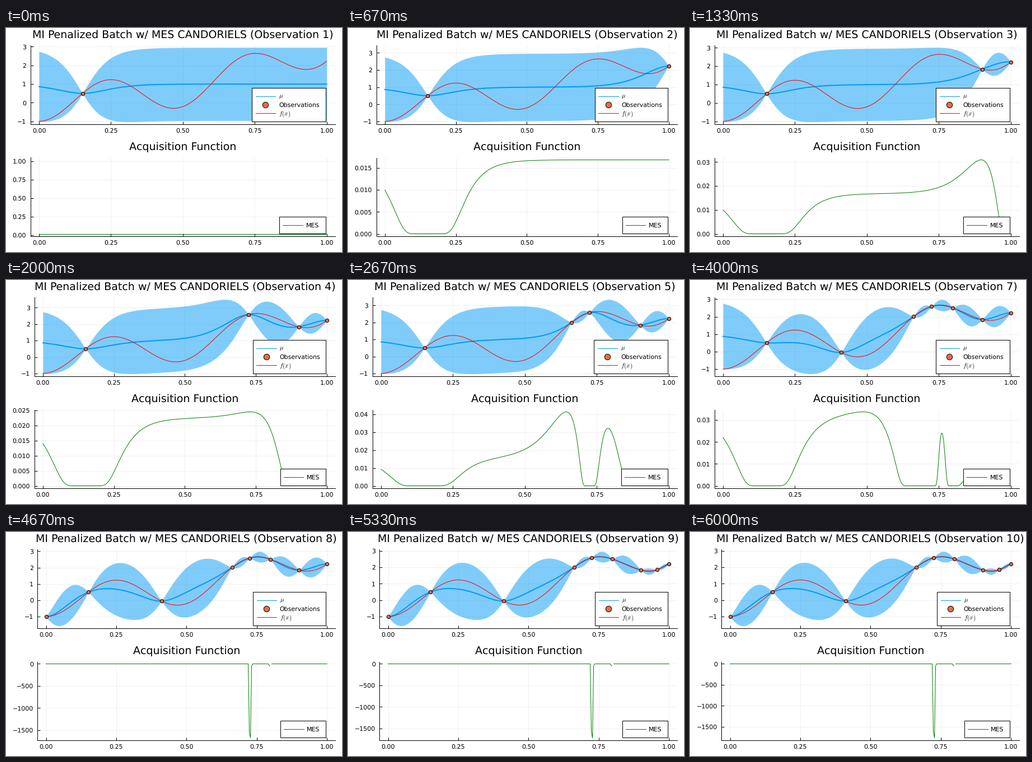
Write a matplotlib script that moves like this. It is 600 by 400 pixels and loops after 6670 ms.

```python
import math

import matplotlib.pyplot as plt
import numpy as np
from matplotlib.animation import FuncAnimation
from matplotlib.patches import Rectangle

W, H, DPI = 600, 400, 100
PX = 72 / DPI  # one pixel in points
BLUE, ORANGE = "#009AF9", "#E26F46"
RIGHT = 588
FRAMES, INTERVAL = 145, 46

plt.rcParams.update({
    "font.family": "DejaVu Sans",
    "font.size": 8,
    "mathtext.fontset": "cm",
    "text.hinting": "none",
    "text.hinting_factor": 1,
})

# Points in the order they are sampled, and the maximum expected before each
SAMPLES = [0.151, 1, 0.901, 0.7245, 0.6625, 0.7985, 0.411, 0, 0.958, 0.958]
BEST = [3.4, 3.4, 3.4, 3.25, 3.43, 3.35, 3.03]

grid = np.linspace(0, 1, 601)
erf = np.vectorize(math.erf)


def f(x):
    return -np.cos(13 * x) + x * (0.53 + 1.44 * x + 1.16 * x * x)


def matern(a, b, scale=0.1):
    r = math.sqrt(5) * np.abs(a[:, None] - b[None, :]) / scale
    return (1 + r + r * r / 3) * np.exp(-r)


def posterior(obs):
    """Mean and deviation on the grid, with prior mean 1 and variance 1."""
    obs = np.unique(np.array(obs, float))
    if not len(obs):
        return np.ones_like(grid), np.ones_like(grid)
    cov = matern(obs, obs) + 1e-8 * np.eye(len(obs))
    cross = matern(grid, obs)
    mean = 1 + cross @ np.linalg.solve(cov, f(obs) - 1)
    var = 1 - np.sum(cross * np.linalg.solve(cov, cross.T).T, axis=1)
    return mean, np.sqrt(np.maximum(var, 1e-8))


def entropy(obs, best):
    mean, dev = posterior(obs)
    g = (best - mean) / dev
    pdf = np.exp(-g * g / 2) / math.sqrt(2 * math.pi)
    cdf = (1 + erf(g / math.sqrt(2))) / 2
    return 0.62 * g * pdf / (2 * cdf)


def breakdown(depth):
    """Coarsely sampled spike with a small dip and a gap after it."""
    x = np.linspace(0, 1, 251)
    y = -depth * np.exp(-(np.abs(x - 0.7268) / 0.0042) ** 6)
    y -= 50 * np.exp(-((x - 0.796) / 0.0022) ** 2)
    y[np.abs(x - 0.8) < 0.001] = np.nan
    return x, y


def acquisition(step):
    if step < len(BEST):
        return grid, entropy(SAMPLES[:step], BEST[step])
    return breakdown(1675 + 45 * (step - len(BEST)))


def limits(lo, hi):
    if hi == lo:
        hi = lo + 1
    pad = 0.03 * (hi - lo)
    return lo - pad, hi + pad


def ticks(lo, hi):
    """Round tick values, at most six intervals, with their labels."""
    power = 10.0 ** math.floor(math.log10((hi - lo) / 6))
    gap = next(m * power for m in (1, 2.5, 5, 10) if (hi - lo) / (m * power) <= 6)
    digits = len(f"{gap:g}".partition(".")[2])
    values = np.arange(math.ceil(lo / gap), math.floor(hi / gap) + 1) * gap
    labels = ["\u2212" * (v < 0) + f"{abs(v):.{digits}f}" for v in values]
    return values, labels


def label_width(text):
    em = {".": 0.318, "\u2212": 0.838}
    return 8 / PX * sum(em.get(c, 0.636) for c in text)


def style(ax, left, bottom, height, span, marks):
    """Place the panel (pixels from the top) and set its ticks."""
    ax.set_position([left / W, 1 - bottom / H, (RIGHT - left) / W, height / H])
    ax.set_xlim(-0.03, 1.03)
    ax.set_ylim(*span)
    ax.set_yticks(*marks)
    xt = np.linspace(0, 1, 5)
    ax.set_xticks(xt, [f"{t:.2f}" for t in xt])
    ax.tick_params(direction="in", length=5 * PX, width=PX)
    ax.tick_params(axis="x", pad=7.2 * PX)
    ax.tick_params(axis="y", pad=7.5 * PX)
    ax.grid(True, color="black", alpha=0.06, lw=PX)
    ax.set_axisbelow(True)
    ax.patch.set_visible(False)
    ax.spines[["top", "right"]].set_visible(False)
    ax.spines[["left", "bottom"]].set_linewidth(PX)


def box(x, y, right, bottom):
    over.add_patch(Rectangle((x, y), right - x, bottom - y, fc="white",
                             ec="black", lw=PX))


def dots(ax, x, y, size):
    ax.plot(x, y, "o", ms=size * PX, mfc=ORANGE, mec="black", mew=PX, zorder=4)


def entry(x, y, label, color=None):
    if color:
        over.plot([x, x + 35.5], [y, y], color=color, lw=PX)
    else:
        dots(over, [x + 17.5], [y], 10.4)
    over.text(x + 41, y, label, va="center_baseline")


def legends(shift):
    box(439.5 + shift, 106.5, 570.5, 167)
    entry(446 + shift, 121.5, r"$\mu$", BLUE)
    entry(446 + shift, 137, "Observations")
    entry(446 + shift, 152, "$f(x)$", "red")
    box(488.5 + shift, 336.5, 570.5, 367)
    entry(494.5 + shift, 352, "MES", "green")


def draw_step(step):
    for ax in (top, low, over):
        ax.cla()
    obs = np.array(SAMPLES[:step + 1], float)
    mean, dev = posterior(obs)
    lower, upper = mean - 1.96 * dev, mean + 1.96 * dev
    truth = f(grid)
    x, y = acquisition(step)

    top.fill_between(grid, lower, upper, color=BLUE, alpha=0.5, lw=0)
    top.plot(grid, mean, color=BLUE, lw=2 * PX)
    top.plot(grid, truth, color="red", lw=PX)
    dots(top, obs, f(obs), 6.2)
    low.plot(x, y, color="green", lw=PX)

    # The widest label of the lower panel sets the left edge of both
    span = limits(np.nanmin(y), np.nanmax(y))
    marks = ticks(*span)
    left = 18.9 + max(label_width(s) for s in marks[1])
    style(low, left, 371.5, 140, span, marks)
    span = limits(min(lower.min(), truth.min()), max(upper.max(), truth.max()))
    style(top, left, 171.5, 140.7, span, ticks(*span))

    over.set_xlim(0, W)
    over.set_ylim(H, 0)
    over.axis("off")
    titles = ("MI Penalized Batch w/ MES CANDORIELS "
              f"(Observation {step + 1})", "Acquisition Function")
    for title, base in zip(titles, (17.7, 217.8)):
        over.text((left + RIGHT) / 2, base, title, ha="center",
                  fontsize=18.6 * PX)
    legends((left - 44) * 0.15)


def draw(frame):
    global shown
    step = (frame + 1) * len(SAMPLES) // FRAMES % len(SAMPLES)
    if frame == FRAMES - 1:
        step = len(SAMPLES) - 1
    if step != shown:
        draw_step(step)
        shown = step
    return []


def reset():
    global shown
    shown = None
    return draw(0)


fig = plt.figure(figsize=(W / DPI, H / DPI), dpi=DPI, facecolor="white")
top, low = fig.add_axes([0.1, 0.6, 0.8, 0.3]), fig.add_axes([0.1, 0.1, 0.8, 0.3])
over = fig.add_axes([0, 0, 1, 1], zorder=5)
shown = None

anim = FuncAnimation(fig, draw, frames=FRAMES, init_func=reset,
                     interval=INTERVAL, repeat=True, repeat_delay=0)
plt.show()
```
